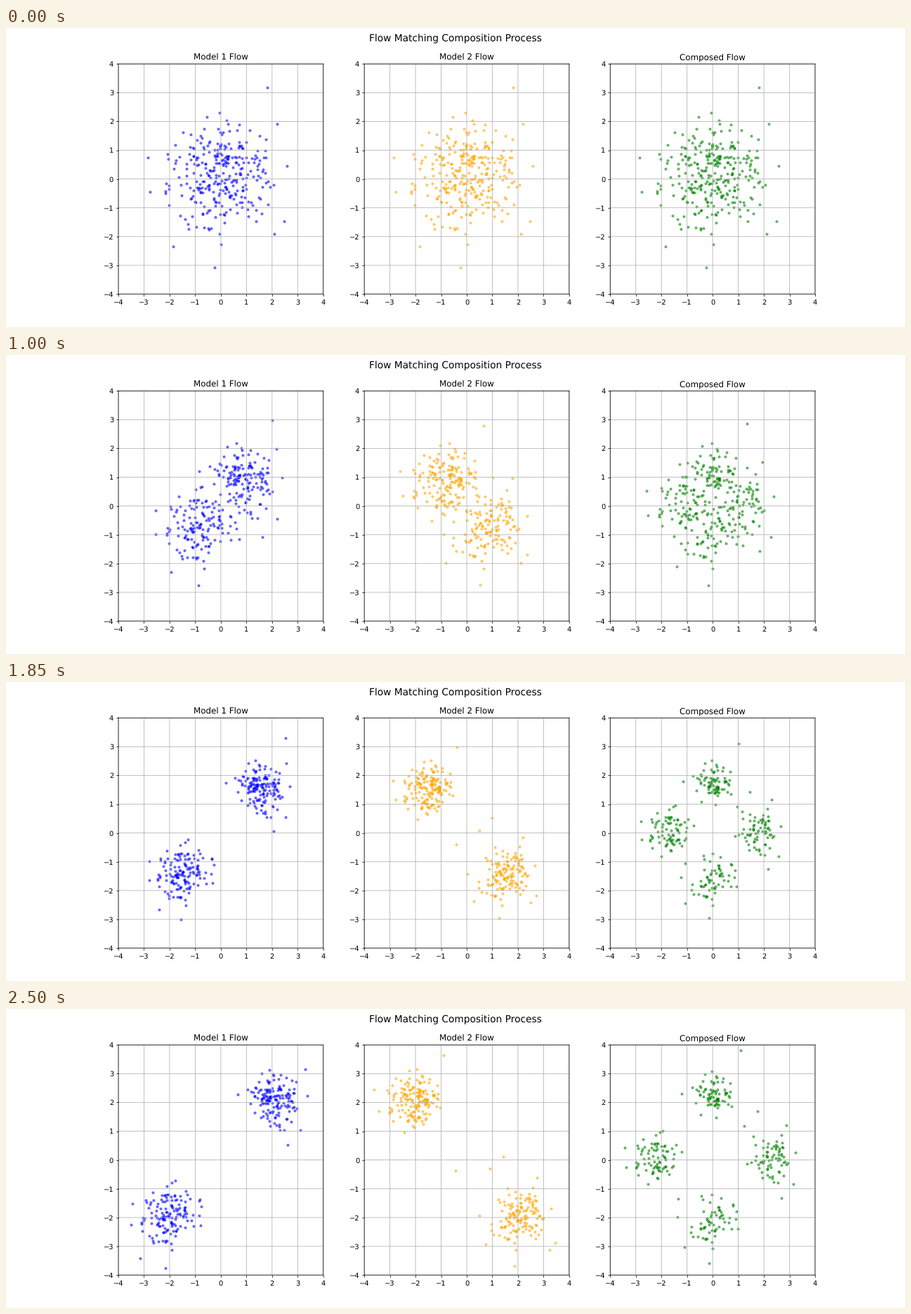
These frames come from a looping animation (1280x427 px, 2.55 s). A matplotlib script:

```python
import numpy as np
import matplotlib.pyplot as plt
from matplotlib.animation import FuncAnimation

plt.rcParams.update({"path.snap": False, "text.hinting": "none"})

FRAMES, INTERVAL = 51, 50
COUNT = 300
MODE = 2 * np.sqrt(2)      # distance of each mode from the centre
SPREAD, CORR = 0.53, 0.17  # final cluster width, start/end correlation


def start_cloud():
    """Normal cloud with a few fixed far points."""
    far = np.array([(1.8, 3.17), (-0.25, -3.08), (-1.85, -2.34),
                    (-2.85, 0.75), (-2.77, -0.45), (2.57, 0.45),
                    (2.48, -1.47), (2.1, -1.91), (2.19, 1.92)])
    pool = np.random.default_rng(3).normal(size=(2 * COUNT, 2))
    near = pool[np.hypot(*pool.T) < 2.3]
    return np.vstack([far, near[:COUNT - len(far)]])


def rotate(p):
    """Swap between x, y and the two diagonals (its own inverse)."""
    a, b = p.T
    return np.column_stack([a + b, a - b]) / np.sqrt(2)


def width(t):
    """Variance of the path at time t and its log-width rate."""
    var = (1 - t)**2 + (SPREAD * t)**2 + 2 * CORR * SPREAD * t * (1 - t)
    slope = t - 1 + t * SPREAD**2 + CORR * SPREAD * (1 - 2 * t)
    return var, slope / var


def shrink(u, t):
    return u * width(t)[1]


def split(u, t, shift=0.0):
    var, rate = width(t)
    gain = min(1.4 * t * MODE / var, 6 - 4 * t)
    goal = MODE * np.tanh(gain * (u - shift * t))
    return goal + (u - t * goal) * rate


def stretch(p):
    """Extra outward push on far points."""
    r = np.hypot(*p.T)[:, None]
    return 0.2 * p * np.maximum(r - 2.8, 0)


def model_1(p, t):
    u, w = p.T
    return np.column_stack([split(u, t, 0.1), shrink(w, t)]) + stretch(p)


def model_2(p, t):
    u, w = p.T
    return np.column_stack([shrink(u, t), split(w, t)]) + stretch(p)


def composed(p, t):
    return (model_1(p, t) + model_2(p, t)) / 2


def integrate(velocity):
    steps = FRAMES - 1
    p = rotate(start_cloud())
    path = [rotate(p)]
    for i in range(steps):
        p = p + velocity(p, i / steps) / steps
        path.append(rotate(p))
    return path


PANELS = [("Model 1 Flow", "blue", model_1),
          ("Model 2 Flow", "orange", model_2),
          ("Composed Flow", "green", composed)]

dpi = 1280 / 18
fig, axes = plt.subplots(1, 3, figsize=(1280.01 / dpi, 427.01 / dpi), dpi=dpi)
fig.suptitle("Flow Matching Composition Process", fontsize=14)

clouds = []
for ax, (title, color, velocity) in zip(axes, PANELS):
    path = integrate(velocity)
    dots = ax.scatter(*path[0].T, s=10, color=color, alpha=0.5)
    ax.set(title=title, xlim=(-4, 4), ylim=(-4, 4),
           xticks=range(-4, 5), yticks=range(-4, 5))
    ax.grid(True)
    clouds.append((dots, path))


def update(i):
    for dots, path in clouds:
        dots.set_offsets(path[i])
    return [dots for dots, _ in clouds]


anim = FuncAnimation(fig, update, frames=FRAMES, interval=INTERVAL,
                     repeat=True, repeat_delay=0, blit=False)
plt.show()
```
